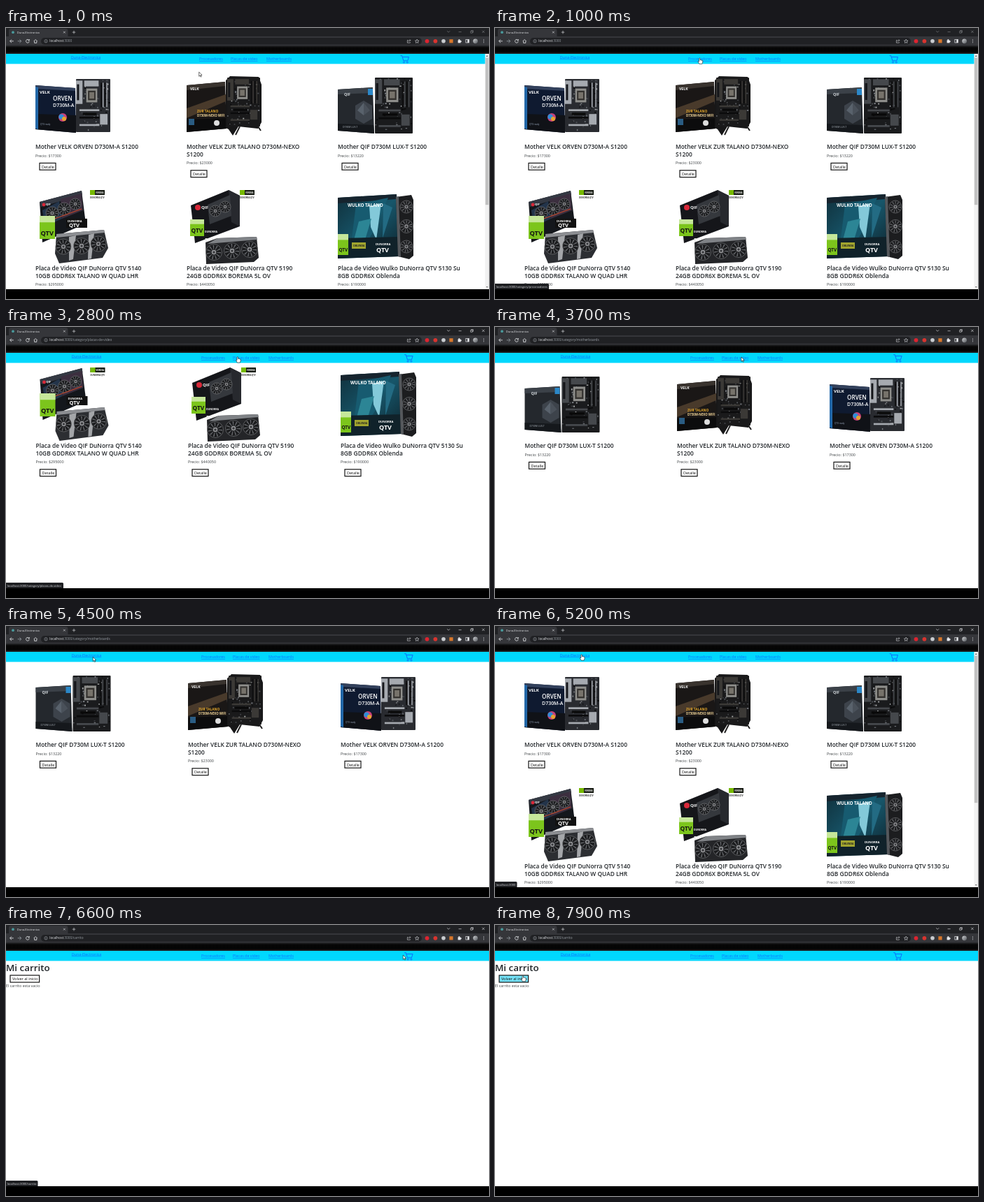
These frames come from a looping animation (690x388 px, 8000 ms). An HTML page:

```html
<!DOCTYPE html>
<html lang="es">
<head>
<meta charset="utf-8">
<title>Duna-Electronica</title>
<style>
  html, body { margin: 0; width: 100%; height: 100%; overflow: hidden; background: #000; }
  svg { display: block; width: 100vw; height: 100vh; font-family: "Open Sans", "Noto Sans", sans-serif; }
  text { white-space: pre; }
</style>
</head>
<body>
<svg id="stage" viewBox="0 0 690 388"></svg>
<script>
const LOOP = 8000, STEP = 100;
const INK = '#212529', BLUE = '#0d6efd', CYAN = '#00d8fd', SHOP = 'Duna-Electronica';

// Drawing helpers, each returning SVG markup
const rect = (x, y, w, h, fill, more = '') =>
  `<rect x="${x}" y="${y}" width="${w}" height="${h}" fill="${fill}" ${more}/>`;
const disc = (x, y, r, fill, more = '') => `<circle cx="${x}" cy="${y}" r="${r}" fill="${fill}" ${more}/>`;
const poly = (points, fill) => `<polygon points="${points}" fill="${fill}"/>`;
const line = (d, stroke, w = 0.7, more = '') =>
  `<path d="${d}" fill="none" stroke="${stroke}" stroke-width="${w}" ${more}/>`;
const text = (x, y, s, size, fill = INK, more = '') =>
  `<text x="${x}" y="${y}" font-size="${size}" fill="${fill}" ${more}>${s}</text>`;
const group = (x, y, body) => `<g transform="translate(${x} ${y})">${body}</g>`;
const gradient = (id, stops, dir = 'x2="1" y2="1"') => `<linearGradient id="${id}" x1="0" y1="0" ${dir}>` +
  stops.map(([at, color]) => `<stop offset="${at}" stop-color="${color}"/>`).join('') + '</linearGradient>';
const BOLD = 'font-weight="700"', SEMI = 'font-weight="600"';

function random(seed) {
  return () => (seed = (seed * 16807) % 2147483647) / 2147483647;
}

// Product pictures, drawn in a 108 x 108 box
function board(x, y, w, h, base, metal, seed) {
  const part = (a, b, c, d, fill) => rect(x + a * w, y + b * h, c * w, d * h, fill);
  const rnd = random(seed);
  let out = rect(x, y, w, h, base, 'rx="1"');
  for (let i = 0; i < 70; i++) {
    const tone = ['#777b80', '#4b4e53', '#a5a7a8', '#0a0a0b'][i % 4];
    out += part(rnd() * 0.95, rnd() * 0.96, 0.015 + rnd() * 0.035, 0.012 + rnd() * 0.02, tone);
  }
  out += part(0, 0.03, 0.19, 0.44, metal) + part(0.24, 0.03, 0.42, 0.11, metal);
  out += part(0.03, 0.1, 0.06, 0.3, '#15161a');
  out += part(0.3, 0.18, 0.32, 0.26, '#8e8e8b') + part(0.35, 0.22, 0.22, 0.18, '#34322f');
  out += part(0.39, 0.25, 0.14, 0.12, '#77736b');
  for (let i = 0; i < 4; i++) out += part(0.72 + i * 0.055, 0.07, 0.03, 0.46, i % 2 ? metal : '#0c0c0d');
  for (let i = 0; i < 3; i++) out += part(0.1, 0.57 + i * 0.14, 0.58, 0.035, i % 2 ? '#0b0b0c' : metal);
  return out + part(0.7, 0.66, 0.22, 0.2, metal) + part(0.2, 0.64, 0.4, 0.04, '#090909');
}

function fan(x, y, r) {
  return disc(x, y, r, '#1b1c1e', 'stroke="#77797c" stroke-width=".7"') +
    disc(x, y, r * 0.6, 'none', `stroke="#6a6c70" stroke-width="${r * 0.55}" stroke-dasharray="${r * 0.1} ${r * 0.24}"`) +
    disc(x, y, r * 0.28, '#9a9b9e') + disc(x, y, r * 0.16, '#3c3d40');
}

const greenTag = (x, y) => rect(x, y, 21, 7, '#161a12') + rect(x, y, 7, 7, '#76b900') +
  text(x + 8, y + 5, 'VORDEA', 2.8, '#fff', BOLD) + text(x, y + 12, 'DUNORRA QTV', 2.8, '#333', BOLD);

const rtxStrip = (x, y, w, h) => rect(x, y, w, h, '#7cc51c') + rect(x, y, w, h * 0.28, '#c6e79a') +
  text(x + 1.5, y + h - 5, 'QTV', w * 0.42, '#111', BOLD);

function chipBox(left, right, model, top, extra) {
  const side = left + 20, tx = side + (right - side) * 0.06;
  const size = (right - tx - 2) / 3.85;
  let out = poly(`${left},5 ${side},0 ${right},4 ${right},101 ${side + 2},107 ${left},100`, 'url(#chipSide)');
  out += poly(`${side},0 ${right},4 ${right},101 ${side + 2},107`, 'url(#chipFront)');
  for (let i = 1; i < 5; i++) {
    out += line(`M${left + i * 4} 5V102`, '#4b86dd', 0.25, 'opacity=".5"');
    out += line(`M${side + 1} ${12 + i * 20}L${right} ${4 + i * 18}`, '#6c9fe8', 0.25, 'opacity=".5"');
  }
  out += poly(`${side + 8},104 ${right},66 ${right},101`, '#3f78d2') + poly(`${left},70 ${side},86 ${side + 2},107 ${left},100`, '#173d90');
  out += disc(right - 9, top - 18, 4.8, '#e9f0fb');
  out += text(tx, top + 4, '10TH GEN', 6.2, '#fff', BOLD);
  return out + text(tx, top + 27, 'RILO ' + model, size, '#fff', BOLD) + extra;
}

const art = {
  orven:
    poly('0,25 57,29 58,93 0,88', '#0f1a30') + poly('0,25 57,29 57,33 0,30', '#33415c') +
    poly('0,66 58,68 58,93 0,88', '#101217') + poly('0,27 4,28 4,88 0,87', '#2267a8') +
    text(6, 37, 'VELK', 6, '#fff', BOLD) + text(25, 47, 'ORVEN', 8.2, '#fff', SEMI) +
    text(25, 56, 'D730M-A', 7, '#fff', SEMI) + disc(39, 71, 6, '#c7417c') + disc(37, 70, 3.6, '#2d8fd8') +
    disc(41, 73, 3, '#e6a530') + text(7, 82, 'QTV ready', 3, '#9aa8bd') +
    board(58, 16, 49, 76, '#292b30', '#a6aab0', 71),
  zur:
    poly('0,25 55,20 57,87 0,92', '#1a1716') + poly('0,25 55,20 55,26 0,32', '#39332e') +
    poly('0,58 56,38 56,48 0,72', '#493a2b') + poly('0,74 57,72 57,87 0,92', '#0c0c0d') +
    text(5, 32, 'VELK', 5.2, '#eee', BOLD) + text(15, 64, 'ZUR TALANO', 4.8, '#e2a72d', BOLD) +
    text(15, 70, 'D730M-NEXO WIFI', 4.4, '#f3d79a', BOLD) + disc(43, 79, 4, '#ddd') +
    rect(3, 73, 8, 9, '#2a5c83') +
    poly('56,18 62,12 103,13 107,24 107,78 102,87 74,84 66,97 60,88 56,86', '#171718') +
    board(58, 14, 47, 70, '#1a1a1b', '#3b3936', 219) + line('M76 84L70 96M102 84L106 90', '#222', 2),
  qif:
    poly('0,31 50,28 52,94 0,90', '#24282d') + poly('0,31 50,28 50,36 0,38', '#3b4148') +
    poly('25,54 37,47 49,54 49,73 37,80 25,73', '#3d434b') + poly('28,61 37,50 37,68', '#59626c') +
    poly('37,50 46,61 37,68', '#4a515a') + poly('0,80 51,82 52,94 0,90', '#15181c') +
    text(9, 40, 'QIF', 5.4, '#d7dce0', BOLD) + rect(43, 30, 7, 9, '#2b88c8') +
    text(7, 86, 'D730M LUX-T', 3.4, '#aeb6be') +
    board(53, 14, 54, 80, '#1a1b1d', '#45484c', 503),
  card1:
    poly('6,18 66,2 72,49 10,76', '#14171c') + poly('6,18 66,2 67,8 8,25', '#343943') +
    poly('10,30 34,17 38,42 14,53', '#23344a') + poly('36,14 66,6 68,30 38,42', '#3c2f3f') +
    fan(24, 34, 9) + fan(41, 28, 9) + fan(57, 21, 8) + line('M14 47L66 28', '#c2462b', 1.2) +
    disc(12, 22, 2.4, '#d9293a') + text(15, 23, 'QIF', 4, '#fff', BOLD) +
    rtxStrip(6, 38, 22, 33) + rect(44, 42, 30, 13, '#111') + text(46, 47, 'DUNORRA', 4, '#fff', BOLD) +
    text(48, 54, 'QTV', 7.5, '#fff', BOLD) + greenTag(78, 1) +
    poly('30,64 98,58 104,84 96,98 34,106 28,92', '#2c2e32') + poly('30,64 98,58 99,62 30,69', '#8c8e92') +
    poly('48,68 58,66 54,100 48,102', '#a4a6a9') + poly('76,65 84,63 80,99 75,100', '#a4a6a9') +
    fan(40, 82, 11) + fan(66, 81, 11.5) + fan(90, 78, 11),
  card2:
    poly('6,23 60,1 76,9 76,53 12,77', '#15161a') + poly('60,1 76,9 76,53 64,47', '#27292e') +
    poly('30,22 62,8 64,38 33,50', '#35383d') + fan(41, 31, 8) + fan(55, 25, 8) +
    disc(16, 26, 4, '#d9293a') + text(21, 28, 'QIF', 6, '#fff', BOLD) +
    rtxStrip(5, 43, 20, 24) + text(26, 62, 'DUNORRA', 3.5, '#fff', BOLD) +
    text(26, 75, 'BOREMA 5L', 6.2, '#e8e8e8', BOLD) + greenTag(76, 1) +
    poly('27,76 44,70 100,68 103,98 96,104 28,107', '#242528') + poly('44,70 100,68 101,72 30,78', '#7f8286') +
    fan(39, 90, 11.5) + fan(65, 88, 11.5) + fan(90, 86, 11.5),
  card3:
    poly('0,12 84,7 88,96 0,99', 'url(#aurora)') + poly('0,12 84,7 84,14 0,20', '#16242e') +
    poly('26,22 72,12 50,62 30,92 20,70', '#175b70') + poly('45,24 62,20 55,72 47,54', '#83c9d9') +
    poly('30,46 48,42 36,82 22,76', '#2c8595') + poly('65,20 78,26 64,70', '#236b83') +
    poly('0,70 88,68 88,96 0,99', '#10222a') + text(14, 25, 'WULKO TALANO', 6.3, '#fff', BOLD) +
    rtxStrip(0, 64, 15, 30) + rect(20, 76, 20, 9, '#a1a52f') + text(22, 82, 'OBLENDA', 3.4, '#222', BOLD) +
    text(54, 80, 'DUNORRA', 4.2, '#fff', BOLD) + text(55, 90, 'QTV', 9, '#fff', BOLD) +
    poly('83,11 105,8 108,15 108,95 102,100 86,96', '#1c1d1f') + poly('83,11 87,10 90,97 86,96', '#55585c') +
    fan(98, 25, 9) + fan(98, 53, 9.5) + fan(98, 82, 9),
  chip4: chipBox(9.5, 98, 'k4', 34, ''),
  chip8: chipBox(13, 95, 'k8', 38, text(66, 79, 'UNLOCKED', 4.6, '#fff', BOLD) + text(34, 91, 'Graphics', 2.8, '#cfe0fb') + text(34, 95, 'required', 2.8, '#cfe0fb')),
  chip6: chipBox(10, 98, 'k6', 34, '')
};

const goods = {
  orven: [17300, 'Mother VELK ORVEN D730M-A S1200'],
  zur: [23000, 'Mother VELK ZUR TALANO D730M-NEXO', 'S1200'],
  qif: [13220, 'Mother QIF D730M LUX-T S1200'],
  card1: [295000, 'Placa de Video QIF DuNorra QTV 5140', '10GB GDDR6X TALANO W QUAD LHR'],
  card2: [440050, 'Placa de Video QIF DuNorra QTV 5190', '24GB GDDR6X BOREMA 5L OV'],
  card3: [190000, 'Placa de Video Wulko DuNorra QTV 5130 Su', '8GB GDDR6X Oblenda'],
  chip4: [19430, 'Procesador Ombra Rilo k4 20300 4.3GHz'],
  chip8: [49500, 'Procesador Ombra Rilo k8 20800PD 5.1GHz'],
  chip6: [25330, 'Procesador Ombra Rilo k6 20600 4.3GHz']
};

const pages = {
  home: { path: '', items: ['orven', 'zur', 'qif', 'card1', 'card2', 'card3'] },
  chips: { path: '/category/procesadores', items: ['chip4', 'chip8', 'chip6'] },
  cards: { path: '/category/placas-de-video', items: ['card1', 'card2', 'card3'] },
  boards: { path: '/category/motherboards', items: ['qif', 'zur', 'orven'] },
  cart: { path: '/carrito', items: [] }
};
const statusWidth = { home: 31.5, chips: 77, cards: 82, boards: 79, cart: 45.5 };

const button = (x, y, w, h, label, id = '') =>
  rect(x, y, w, h, '#fff', `id="${id}" stroke="#151515" stroke-width="1.2"`) + text(x + 2.9, y + 7.3, label, 5.5, '#111');

function product(name, x, y) {
  const [price, ...lines] = goods[name];
  const drop = (lines.length - 1) * 10.4;
  return group(x, y, art[name] +
    lines.map((s, i) => text(0, 116.3 + i * 10.5, s, 8.4, INK, SEMI)).join('') +
    text(0, 127.8 + drop, 'Precio: $' + price, 5.4, '#3c4043') +
    button(6, 136.4 + drop, 23, 9.8, 'Detalle'));
}

function navBar(home) {
  const xs = home ? [92.7, 276, 321, 372, 563.3] : [93.7, 279, 324, 375, 568.9];
  const link = (x, y, s) => text(x, y, s, 5.38, BLUE, 'text-decoration="underline"');
  const cart = line('M.3 1.2H2.4L4.6 8.4H10.5L12.2 3H3', BLUE, 1) +
    disc(5.2, 10.6, 1.1, 'none', `stroke="${BLUE}" stroke-width=".8"`) +
    disc(10, 10.6, 1.1, 'none', `stroke="${BLUE}" stroke-width=".8"`);
  return rect(0, 37, 690, 14.4, CYAN) + link(xs[0], 43.6, SHOP) + link(xs[1], 46.2, 'Procesadores') +
    link(xs[2], 46.2, 'Placas de video') + link(xs[3], 46.2, 'Motherboards') + group(xs[4], 38.5, cart);
}

function pageMarkup(key) {
  const home = key === 'home', xs = home ? [42, 258, 474] : [42.5, 260, 478];
  let out = navBar(home);
  pages[key].items.forEach((name, i) => out += product(name, xs[i % 3], 57 + 174 * Math.floor(i / 3)));
  if (key === 'cart') {
    out += text(0, 66, 'Mi carrito', 13.4, INK, SEMI) + button(6, 72, 41.6, 10, 'Volver al inicio', 'back') +
      text(0, 88.8, 'El carrito esta vacio', 5.4, '#3c4043');
  }
  return `<g id="page-${key}">${out}</g>`;
}

function browser() {
  const W = '#e8eaed', G = '#9aa0a6';
  let out = rect(0, 0, 690, 12.5, '#202124') + rect(4, 1, 84.5, 14, '#35363a', 'rx="3"') + rect(0, 12, 690, 13.5, '#35363a');
  out += rect(0, 25, 690, 12, 'url(#shade)');
  out += disc(10, 6.2, 1.9, '#4a9a9c') + text(15.8, 7.7, SHOP, 4.05, W);
  out += line('M82 4.7l2.8 2.8m0-2.8l-2.8 2.8M97 3.8v4.6m-2.3-2.3h4.6', W, 0.6);
  out += `<g id="controls">${line('M630.2 4.2l2 2 2-2M646.6 5.6h4M663.7 4.6h2.6v2.6h-2.6zM664.7 4.4v-.8h2.7v2.7h-.9M680.2 3.6l3.4 3.4m0-3.4l-3.4 3.4', W, 0.6)}</g>`;
  out += rect(50, 14, 544, 9.8, '#202124', 'rx="4.9"');
  out += line('M10.8 18.8H5.7m2.3-2.4l-2.4 2.4 2.4 2.4', W, 0.8) + line('M16.7 18.8h5m-2.3-2.4l2.4 2.4-2.4 2.4', G, 0.8);
  out += line('M32.8 17.3a2.4 2.4 0 1 0 .5 2M33.3 16v2h-2', W, 0.8) + line('M39.7 19l2.5-2.5 2.5 2.5M40.6 18.6v2.8h3.2v-2.8', W, 0.8);
  out += line('M57 18.5v1.8M57 17.2v.6', G, 0.6) + disc(57, 18.8, 2.2, 'none', `stroke="${G}" stroke-width=".6"`);
  out += `<text x="62.2" y="20.4" font-size="4.76" fill="${G}"><tspan fill="${W}">localhost</tspan>:3000<tspan id="path"></tspan></text>`;
  out += line('M575 17.6h-1.6v3.6h4v-1M575.2 19.6c.2-1.6 1-2 2.6-2m-1.2-1.3l1.3 1.3-1.3 1.3', W, 0.55);
  out += line('M587.2 16.2l.8 1.8 2 .2-1.5 1.3.4 2-1.7-1-1.7 1 .4-2-1.5-1.3 2-.2z', W, 0.55);
  out += disc(601.5, 18.8, 2.9, '#dc2430') + disc(613.4, 18.8, 2.9, '#d8342f') + disc(625, 18.8, 2.8, '#c9cccf') + rect(633.4, 16.2, 5.2, 5.2, '#d9772a');
  out += rect(645.6, 17.4, 4, 4, W) + disc(647.4, 17, 1, W) + disc(649.8, 19.3, 1, W);
  out += rect(656.9, 16.6, 4.4, 4.4, 'none', `stroke="${W}" stroke-width=".7"`) + rect(659.3, 16.6, 2, 4.4, W);
  out += disc(670.6, 18.8, 3.4, 'url(#avatar)');
  return out + [16.8, 18.8, 20.8].map(y => disc(682.4, y, 0.55, W)).join('');
}

const scrollBar = rect(684.4, 37, 5.6, 337, '#f1f1f1') + rect(684.9, 42.6, 4.4, 210.6, '#c1c1c1') +
  poly('685.8,41 687.2,39 688.6,41', '#555') + poly('685.8,370 687.2,372 688.6,370', '#777');
const arrow = '<path d="M0 0V6.2L1.5 4.9 2.5 7.1 3.5 6.6 2.5 4.5 4.4 4.4Z" fill="#fff" stroke="#111" stroke-width=".6"/>';
const hand = '<path d="M-.8 5V.6Q0-.5.8.6V3Q1.6 2.4 2.1 3.1 2.8 2.6 3.3 3.4 4.3 3 4.4 4.2V6.2L3.5 8.4H-.4L-2.2 5.4Q-2.3 4.2-.8 5Z" fill="#fff" stroke="#111" stroke-width=".6"/>';

const stage = document.getElementById('stage');
stage.innerHTML = '<defs>' +
  gradient('chipFront', [[0, '#2551b0'], [0.55, '#1f52b4'], [1, '#2f6bcb']]) +
  gradient('chipSide', [[0, '#2f63bd'], [1, '#1c479f']]) +
  gradient('aurora', [[0, '#10303c'], [0.5, '#17566a'], [1, '#0d2029']]) +
  gradient('avatar', [[0, '#d0d2d4'], [1, '#55595e']]) +
  gradient('shade', [[0, '#2b2c2f'], [0.25, '#070707'], [0.75, '#040404'], [1, '#242528']], 'x2="0" y2="1"') +
  '</defs>' + rect(0, 0, 690, 388, '#fff') + Object.keys(pages).map(pageMarkup).join('') +
  `<g id="scroll">${scrollBar}</g>` + browser() + rect(0, 374, 690, 14, '#000') +
  `<g id="status"><path id="statusBox" fill="#202124"/>${text(1.8, 371.6, '', 4.1, '#dadce0', 'id="statusText"')}</g>` +
  `<g id="cursor"><g id="arrow">${arrow}</g><g id="hand">${hand}</g></g>`;

const $ = id => document.getElementById(id);
const show = (id, on) => $(id).setAttribute('display', on ? 'inline' : 'none');

// Timelines: [start ms, value]
const pageSteps = [[0, 'home'], [1500, 'chips'], [2700, 'cards'], [3500, 'boards'], [4900, 'home'], [6400, 'cart']];
const statusSteps = [[0, ''], [900, 'chips'], [2400, 'cards'], [3200, 'boards'], [3700, ''], [4700, 'home'], [5500, ''], [6100, 'cart'], [7000, '']];
const handSteps = [[0, 0], [800, 1], [2300, 0], [2400, 1], [3600, 0], [4600, 1], [5300, 0], [5900, 1], [6400, 0], [7900, 1]];
const scrollSteps = [[0, 1], [1500, 0], [5200, 1], [6400, 0]];
const moves = [
  [100, 275.7, 63], [900, 292.3, 43], [1800, 292.3, 43], [2600, 330.8, 42.6], [3000, 330.8, 42.6],
  [3300, 394, 42.8], [3500, 394, 42.8], [4300, 124.2, 44.4], [4500, 124.2, 44.4], [4700, 123.6, 40.8],
  [5200, 123.6, 40.8], [6000, 567.2, 43], [6600, 567.2, 43], [6900, 412, 60], [7800, 39.8, 72.4]
];

const stepAt = (steps, t) => steps.findLast(([start]) => start <= t);

function cursorAt(t) {
  const next = moves.findIndex(([at]) => at > t);
  if (next < 1) return moves.at(next).slice(1);
  const [t0, x0, y0] = moves[next - 1], [t1, x1, y1] = moves[next];
  const p = (t - t0) / (t1 - t0), e = p * p * (3 - 2 * p);
  return [x0 + (x1 - x0) * e, y0 + (y1 - y0) * e];
}

function draw(t) {
  const page = stepAt(pageSteps, t)[1];
  for (const key in pages) show('page-' + key, key === page);
  $('path').textContent = pages[page].path;
  show('scroll', stepAt(scrollSteps, t)[1]);
  $('controls').setAttribute('opacity', t < 1400 ? 0.5 : 1);
  $('back').setAttribute('fill', t >= 7900 ? '#74e2f7' : '#fff');

  const [since, target] = stepAt(statusSteps, t);
  show('status', target);
  if (target) {
    const fresh = t - since < STEP && !stepAt(statusSteps, since - 1)[1];
    $('status').setAttribute('opacity', fresh ? 0.6 : 1);
    $('statusBox').setAttribute('d', `M0 366H${statusWidth[target] - 1.5}q1.5 0 1.5 1.5V374H0Z`);
    $('statusText').textContent = 'localhost:3000' + pages[target].path;
  }

  const pointing = stepAt(handSteps, t)[1];
  show('hand', pointing);
  show('arrow', !pointing);
  $('cursor').setAttribute('transform', `translate(${cursorAt(t)})`);
}

const began = performance.now();
function tick() {
  const t = (performance.now() - began) % LOOP;
  draw(Math.floor(t / STEP) * STEP);
  requestAnimationFrame(tick);
}
tick();
</script>
</body>
</html>
```
